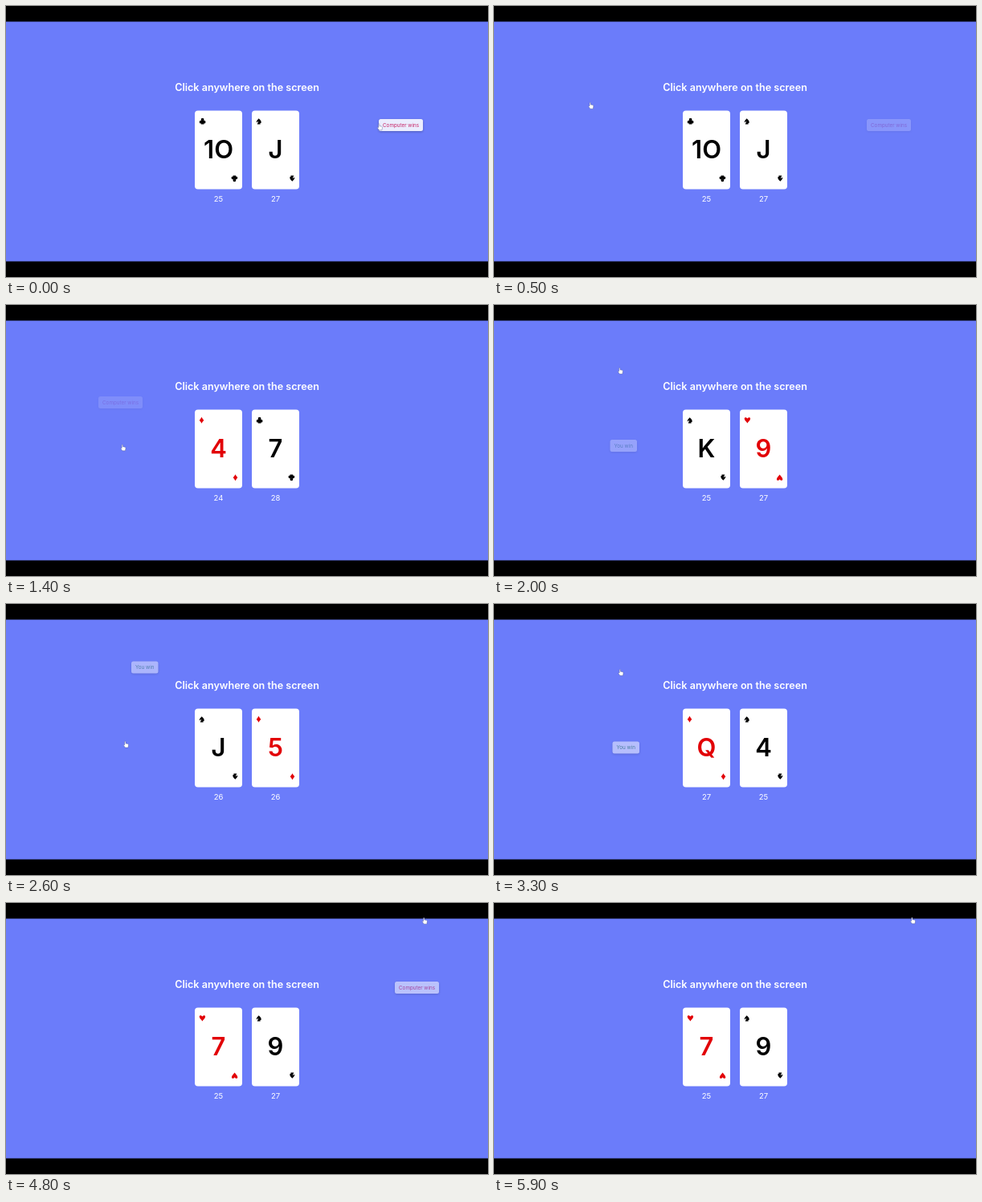
An HTML page for the animation above (6000 ms loop, 600 by 338 pixels).

```html
<!DOCTYPE html>
<html lang="en">
<head>
<meta charset="utf-8">
<title>Card duel</title>
<style>
  html, body { margin: 0; width: 100%; height: 100%; overflow: hidden; background: #000; }
  svg { display: block; width: 100vw; height: 100vh; }
  text { font-family: Inter, "Open Sans", sans-serif; text-anchor: middle; }
  .title { font-size: 12.6px; font-weight: 600; fill: #fff; }
  .rank { font-size: 31px; font-weight: 600; }
  .count { font-size: 9.5px; fill: #fff; }
  .toast { filter: drop-shadow(0 1px 1.5px rgba(0, 0, 0, .3)); }
  .toast text { font-size: 6.3px; text-anchor: start; }
</style>
</head>
<body>
<svg id="stage" viewBox="0 0 600 338">
  <rect width="600" height="338"/>
  <rect y="19.5" width="600" height="299" fill="#6b7cfa"/>
  <text class="title" x="300" y="106">Click anywhere on the screen</text>
</svg>
<script>
const LOOP = 6000, STEP = 100, FADE = 750;
const CARD_W = 59, MARGIN = 5.7, PADDING = 5;
const RED = '#e20006', BLACK = '#000';
const ORDER = ['2', '3', '4', '5', '6', '7', '8', '9', '10', 'J', 'Q', 'K', 'A'];

// Suit outlines, centred on the origin
const STEM = 'M0-1L2 3.7H-2Z';
const dot = (x, y, r = 1.9) =>
  `M${x - r} ${y}a${r} ${r} 0 1 1 ${2 * r} 0a${r} ${r} 0 1 1 ${-2 * r} 0`;
const SUITS = {
  '♣': { w: 7.8, fill: BLACK, d: dot(0, -2) + dot(-2, 1) + dot(2, 1) + STEM },
  '♠': { w: 6, fill: BLACK, d: 'M0-3.5C1-2 3-1 3 1S1 3 0 1-3 3-3 1-1-2 0-3.5' + STEM },
  '♥': { w: 7.4, fill: RED, d: 'M0 3.7C-1 2-3.7 0-3.7-2S-1-4 0-2C1-4 3.7-4 3.7-2S1 2 0 3.7' },
  '♦': { w: 5.6, fill: RED, d: 'M0-4Q1-2 2.8 0Q1 2 0 4Q-1 2-2.8 0Q-1-2 0-4' }
};

// Each click: time, place and the cards it deals
const ROUNDS = [
  { at: -100, x: 464, y: 148.5, cards: ['10♣', 'J♠'] },
  { at: 750, x: 115, y: 121.5, cards: ['4♦', '7♣'] },
  { at: 1470, x: 144.5, y: 175.5, cards: ['K♠', '9♥'] },
  { at: 2180, x: 156, y: 79, cards: ['J♠', '5♦'] },
  { at: 2930, x: 147.5, y: 179, cards: ['Q♦', '4♠'] },
  { at: 3920, x: 254.5, y: 64.5, cards: ['8♥', 'K♥'] },
  { at: 4450, x: 484, y: 105.5, cards: ['7♥', '9♠'] }
];

// The winner of a round takes one card from the other pile
let pile = 26;
for (const round of ROUNDS) {
  const [mine, theirs] = round.cards.map(card => ORDER.indexOf(card.slice(0, -1)));
  round.won = mine > theirs;
  pile += round.won ? 1 : -1;
  round.counts = [pile, 52 - pile];
}

// The pointer visits every click, pauses once and leaves at the top
const STOPS = [...ROUNDS, { at: 3350, x: 156.5, y: 83 }, { at: 4900, x: 520, y: 19.5 }]
  .sort((a, b) => a.at - b.at);

const stage = document.getElementById('stage');

function add(parent, tag, attrs = {}, label = '') {
  const el = document.createElementNS('http://www.w3.org/2000/svg', tag);
  for (const key in attrs) el.setAttribute(key, attrs[key]);
  el.textContent = label;
  return parent.appendChild(el);
}

function makeCard(x) {
  const mid = x + CARD_W / 2;
  add(stage, 'rect', { x, y: 130.5, width: CARD_W, height: 98, rx: 4, fill: '#fff' });
  const rank = add(stage, 'text', { class: 'rank', x: mid, y: 190.2 });
  const pips = [add(stage, 'path'), add(stage, 'path')];
  const count = add(stage, 'text', { class: 'count', x: mid, y: 244.2 });
  return (card, total) => {
    const { w, fill, d } = SUITS[card.slice(-1)];
    const shift = CARD_W / 2 - MARGIN - w / 2;
    // A round O gives the ten its wide, geometric zero
    rank.textContent = card.slice(0, -1).replace('0', 'O');
    rank.setAttribute('fill', fill);
    pips.forEach((pip, i) => {
      pip.setAttribute('d', d);
      pip.setAttribute('fill', fill);
      pip.setAttribute('transform',
        `translate(${mid} 179.5) rotate(${180 * i}) translate(${-shift} -35.8)`);
    });
    count.textContent = total;
  };
}

function makeToast({ x, y, won }) {
  const g = add(stage, 'g', { class: 'toast', transform: `translate(${x} ${y})` });
  const box = add(g, 'rect', { y: -7.5, height: 15, rx: 2.5, fill: '#fff' });
  const label = add(g, 'text', { x: PADDING, y: 2.3, fill: won ? '#2e8049' : '#d3144f' },
    won ? 'You win' : 'Computer wins');
  box.setAttribute('width', label.getComputedTextLength() + 2 * PADDING);
  return g;
}

const showCard = [makeCard(235), makeCard(306)];
const toasts = ROUNDS.map(makeToast);
const hand = add(stage, 'path', {
  d: 'M-.3-1Q.4-2 1 -1V1.2L3.7 1.7Q4.6 2 4.5 3L4 6.3H.3L-1.6 3.4Q-1.6 2.3-.3 3Z',
  fill: '#fff', stroke: '#46508f', 'stroke-width': .4
});

// Rest briefly after a stop, then rush off and slow down at the next
function pointerAt(t) {
  const i = STOPS.findLastIndex(stop => stop.at <= t);
  const from = STOPS[i], to = STOPS[i + 1] || from;
  const u = (t - from.at) / (to.at - from.at || 1);
  const k = 1 - (1 - Math.min(1, Math.max(0, (u - .12) / .88))) ** 4;
  return [from.x + (to.x - from.x) * k, from.y + (to.y - from.y) * k];
}

let shown = null;

function draw(t) {
  const round = ROUNDS.findLast(r => r.at <= t);
  if (round !== shown) {
    showCard.forEach((show, i) => show(round.cards[i], round.counts[i]));
    shown = round;
  }
  toasts.forEach((toast, i) => {
    const age = t - ROUNDS[i].at;
    toast.style.opacity = age < 0 ? 0 : Math.max(0, 1 - age / FADE);
  });
  const [x, y] = pointerAt(t);
  hand.setAttribute('transform', `translate(${x} ${y})`);
}

const start = performance.now();

function tick() {
  const t = (performance.now() - start) % LOOP;
  draw(Math.floor(t / STEP) * STEP);
  requestAnimationFrame(tick);
}
tick();
</script>
</body>
</html>
```
